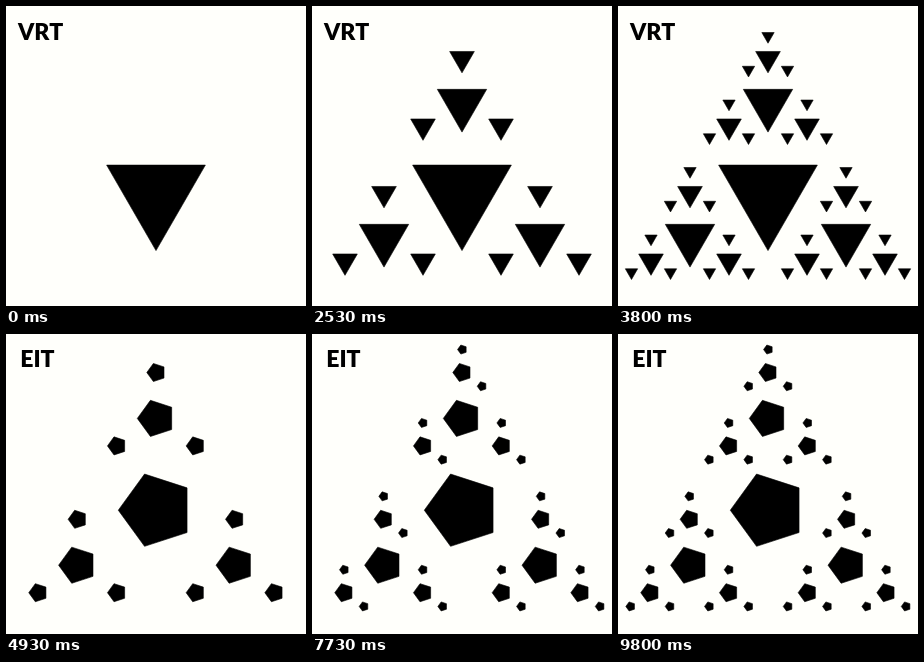
Recreate the animation shown at these times as an HTML page with a canvas. Size 300 px wide and 300 px high, loop 9870 ms.

```html
<!DOCTYPE html>
<html>
<head>
<meta charset="utf-8">
<style>
html, body { margin: 0; width: 100%; height: 100%; overflow: hidden; background: #fffffb; }
canvas { display: block; }
</style>
</head>
<body>
<canvas id="stage" width="300" height="300"></canvas>
<script>
const ctx = document.getElementById('stage').getContext('2d');
const LOOP = 9870;

// up: rise of the top child; side, down: offset of the lower children
const triangles = {
  sides: 3, angle: Math.PI / 2, radius: 57, x: 150, y: 187.6,
  up: 90, side: 78, down: 45, label: 'VRT', labelX: 12, labelY: 34.4
};
const pentagons = {
  sides: 5, angle: Math.PI, radius: 38, x: 150.3, y: 176.2,
  up: 91.8, side: 78.7, down: 55, label: 'EIT', labelX: 14.2, labelY: 32.5
};

// start time, figure, number of complete levels, children added on the next level
const stages = [
  [0, triangles, 1, 0],
  [1330, triangles, 2, 0],
  [2530, triangles, 3, 0],
  [3530, triangles, 4, 0],
  [4930, pentagons, 3, 0],
  [6070, pentagons, 3, 1],
  [7400, pentagons, 3, 2],
  [8670, pentagons, 3, 3]
];

function polygon(fig, x, y, radius) {
  ctx.beginPath();
  for (let i = 0; i < fig.sides; i++) {
    const a = fig.angle + i * 2 * Math.PI / fig.sides;
    ctx.lineTo(x + radius * Math.cos(a), y + radius * Math.sin(a));
  }
  ctx.closePath();
  ctx.fill();
  ctx.stroke();
}

function grow(fig, levels, extra, x = fig.x, y = fig.y, scale = 1) {
  polygon(fig, x, y, fig.radius * scale);
  if (levels < 1) return;
  const children = [[0, -fig.up], [fig.side, fig.down], [-fig.side, fig.down]];
  const count = levels > 1 ? 3 : extra;
  for (const [dx, dy] of children.slice(0, count)) {
    grow(fig, levels - 1, extra, x + dx * scale, y + dy * scale, scale / 2);
  }
}

function draw(now) {
  const t = now % LOOP;
  const [, fig, levels, extra] = stages.findLast(stage => stage[0] <= t);
  ctx.fillStyle = '#fffffb';
  ctx.fillRect(0, 0, 300, 300);
  ctx.fillStyle = ctx.strokeStyle = '#000';
  ctx.lineWidth = 0.6;
  ctx.font = '900 23px Lato, sans-serif';
  ctx.fillText(fig.label, fig.labelX, fig.labelY);
  grow(fig, levels, extra);
  requestAnimationFrame(draw);
}
requestAnimationFrame(draw);
</script>
</body>
</html>
```
